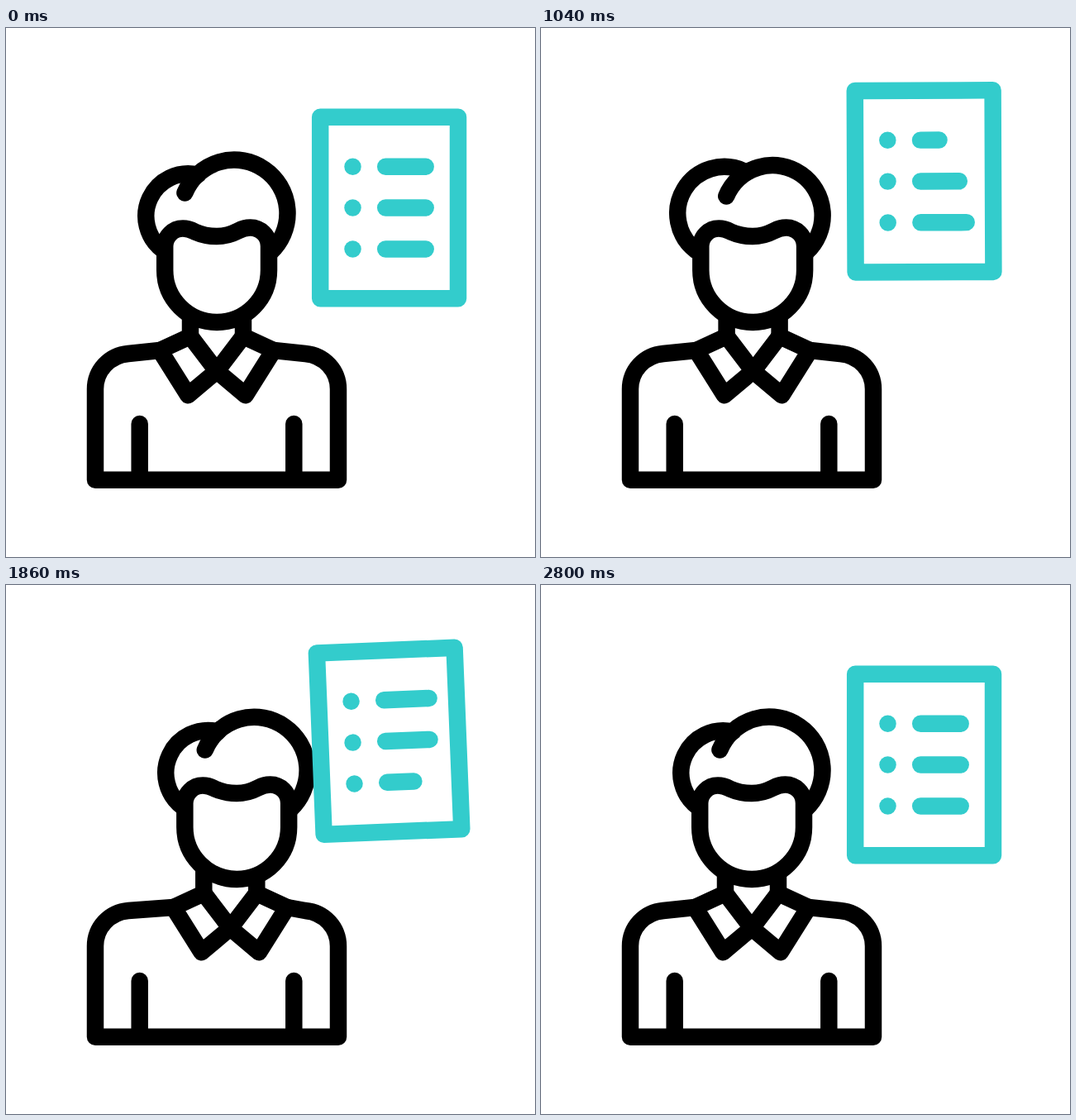
Recreate the animation shown at these times as an HTML page. Size 640 by 640 pixels, loop 3020 ms.

```html
<!DOCTYPE html>
<html lang="en">
<head>
<meta charset="utf-8">
<title>Person with list</title>
<style>
html, body { margin: 0; width: 100%; height: 100%; overflow: hidden; background: #fff; }
svg { display: block; width: 100vw; height: 100vh; }
g {
  fill: none;
  stroke-width: 20.48px;
  stroke-linecap: round;
  stroke-linejoin: round;
}
.person { stroke: #000; }
.sheet { stroke: #33cccc; }
</style>
</head>
<body>
<svg viewBox="0 0 640 640">
  <g class="person">
    <path id="torso"/>
    <path d="M161.7 479 V546.8 M348.3 479 V546.8"/>
    <g id="collar">
      <path style="stroke-linecap: butt" d="M223 346 V373 M287 346 V373"/>
      <path d="M255 415 L223 373 L186.2 390 L220.3 444.2 Z L287 373 L323.8 390 L289.7 444.2 Z"/>
    </g>
    <g id="head">
      <path id="fringe"/>
      <path id="crown"/>
      <path d="M192.2 293 V264.5 A21.8 21.8 0 0 1 214 242.5 Q221 242.5 228 246.3 Q241 252 255 252 Q268 252 281 245.3 Q288 241.5 295.5 241.5 A22.4 22.4 0 0 1 318 264 V293 A62.9 62.9 0 0 1 192.2 293 Z"/>
    </g>
  </g>
  <g class="sheet" id="sheet">
    <rect x="380.2" y="107.7" width="166.8" height="219.6"/>
  </g>
</svg>
<script>
const LOOP = 3020, END = 2800;
const el = id => document.getElementById(id);
const mix = (a, b, k) => a + (b - a) * k;
const clamp = k => Math.min(1, Math.max(0, k));
const smooth = k => k * k * (3 - 2 * k);

// Eases from rest to a, b, a, ... and back to rest; turns are evenly spaced.
function swing(t, { start = 0, first, step, turns, end }, rest, a, b) {
  let value = rest, from = start;
  for (let i = 0; i <= turns && t > from; i++) {
    const to = i < turns ? first + i * step : end;
    const goal = i === turns ? rest : i % 2 ? b : a;
    value = mix(value, goal, smooth(clamp((t - from) / (to - from))));
    from = to;
  }
  return value;
}

const sway = { first: 260, step: 520, turns: 5, end: END };
const rock = { first: 700, step: 700, turns: 3, end: END };
const lift = { first: 1400, step: 1400, turns: 1, end: END };
const stretch = { start: 170, first: 690, step: 520, turns: 3, end: 2250 };

// Clockwise arc, angles in degrees
function arc(cx, cy, r, a0, a1) {
  const at = a => {
    const q = a * Math.PI / 180;
    return `${cx + r * Math.cos(q)} ${cy + r * Math.sin(q)}`;
  };
  const mid = (a0 + a1) / 2;
  return `M${at(a0)} A${r} ${r} 0 0 1 ${at(mid)} A${r} ${r} 0 0 1 ${at(a1)}`;
}

function addPath(d) {
  const path = document.createElementNS("http://www.w3.org/2000/svg", "path");
  path.setAttribute("d", d);
  return el("sheet").appendChild(path);
}

const rows = [0, 1, 2].map(i => {
  const y = 167.7 + 49.85 * i;
  addPath(`M419.5 ${y} h.01`);
  return { y, delay: 200 * i, bar: addPath("") };
});

function draw(t) {
  const headX = swing(t, sway, 0, -22.75, 24.95);
  const neckX = swing(t, sway, 0, -13.6, 16.8);
  const turn = swing(t, sway, 0, 1, 0);

  el("head").setAttribute("transform", `translate(${headX} 0)`);
  el("collar").setAttribute("transform", `translate(${neckX} 0)`);
  el("torso").setAttribute("d",
    `M${186.2 + neckX} 390 L148 394 C125 396 108 414.5 108 437 V546.8
     H402 V437 C402 414.5 385 396 362 394 L${323.8 + neckX} 390`);
  el("fringe").setAttribute("d",
    arc(220.5, mix(227.5, 221, turn), mix(51.2, 61.5, turn), 127, mix(283, 307, turn)));
  el("crown").setAttribute("d",
    arc(mix(276, 282.1, turn), mix(224.1, 229.1, turn), mix(64.5, 56.5, turn), 202.5, 407));

  const y = swing(t, lift, 0, -38.4);
  const tilt = swing(t, rock, 0, -5, 5);
  el("sheet").setAttribute("transform", `translate(0 ${y}) rotate(${tilt} 463.5 217.5)`);
  for (const { y, delay, bar } of rows)
    bar.setAttribute("d", `M459.2 ${y} h${swing(t - delay, stretch, 48.5, 55.5, 11.5)}`);
}

let begin;
function tick(now) {
  begin ??= now;
  draw((now - begin) % LOOP);
  requestAnimationFrame(tick);
}
draw(0);
requestAnimationFrame(tick);
</script>
</body>
</html>
```
